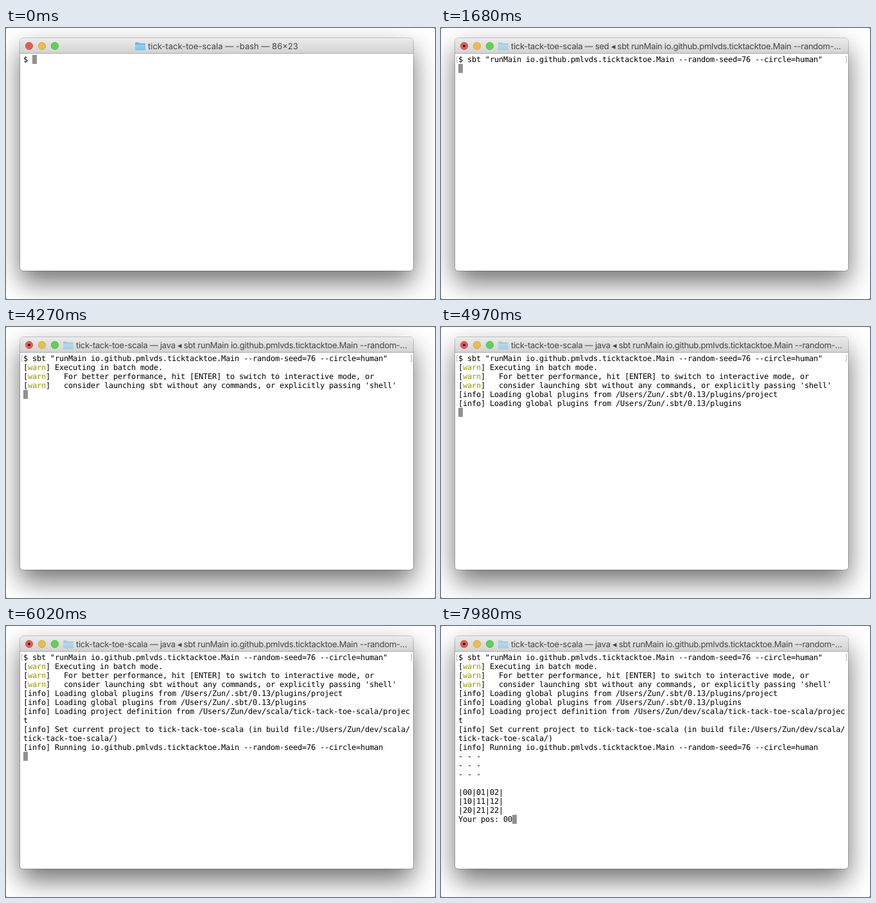
An HTML page that plays this animation: 668x422 px, repeating every 8000 ms.

```html
<!DOCTYPE html>
<html lang="en">
<head>
<meta charset="utf-8">
<title>Terminal session</title>
<style>
  html, body { margin: 0; width: 100%; height: 100%; overflow: hidden; background: #fff; }
  svg { display: block; width: 100vw; height: 100vh; }
  text { text-rendering: geometricPrecision; }
  .title { font: 13px Inter, "DejaVu Sans", sans-serif; fill: #444; }
  .tight { letter-spacing: -0.27px; }
  .mono { font: 12px "DejaVu Sans Mono", monospace; }
</style>
</head>
<body>
<svg viewBox="0 0 668 422" xmlns="http://www.w3.org/2000/svg">
  <defs>
    <filter id="blur" filterUnits="userSpaceOnUse" x="-60" y="-60" width="790" height="560">
      <feGaussianBlur stdDeviation="20"/>
    </filter>
    <linearGradient id="bar" x2="0" y2="1">
      <stop offset="0" stop-color="#ebebeb"/>
      <stop offset="1" stop-color="#d2d2d2"/>
    </linearGradient>
    <linearGradient id="folder" x2="0" y2="1">
      <stop offset="0" stop-color="#93d0f2"/>
      <stop offset="1" stop-color="#7cc3ec"/>
    </linearGradient>
  </defs>

  <rect width="668" height="422" fill="#fff"/>
  <rect x="22" y="34" width="612" height="362" rx="5" opacity=".56" filter="url(#blur)"/>
  <path d="M0 0h1v1h-1zM667 0h1v1h-1zM0 421h1v1h-1zM667 421h1v1h-1z" fill="#555"/>

  <rect x="21.5" y="15.5" width="613" height="363" rx="5.5" fill="none" stroke="#000" stroke-opacity=".2"/>
  <rect x="22" y="16" width="612" height="362" rx="5" fill="#fff"/>
  <path d="M22 40V21a5 5 0 0 1 5-5H629a5 5 0 0 1 5 5V40z" fill="url(#bar)"/>
  <path d="M27 16.5H629" stroke="#f4f4f4"/>
  <path d="M22 39.5H634" stroke="#aaa"/>

  <g stroke-width=".8">
    <circle cx="36" cy="28" r="5.7" fill="#dc5f5b" stroke="#c24d49"/>
    <circle cx="56" cy="28" r="5.7" fill="#e8bd55" stroke="#cfa140"/>
    <circle cx="76" cy="28" r="5.7" fill="#63cf58" stroke="#4db145"/>
  </g>
  <circle id="dot" cx="36" cy="28" r="2" fill="#4a0d0b"/>

  <g id="icon">
    <path d="M0 1.5Q0 .5 1 .5H5.5L7 2H15Q16 2 16 3V11.5Q16 12.500 15 12.500H1Q0 12.500 0 11.5z" fill="#6bb4df"/>
    <path d="M0 4H16V11.5Q16 12.500 15 12.500H1Q0 12.500 0 11.5z" fill="url(#folder)"/>
  </g>
  <text id="title" class="title" y="33"></text>

  <path id="marks" d="M26.500 44.500H24.500V53.500H26.500M629.500 44.500H631.500V53.500H629.500" fill="none" stroke="#b4b4b4"/>
  <rect id="cursor" width="7" height="14" fill="#919191"/>
  <g id="screen" class="mono"></g>
</svg>

<script>
const LOOP = 8000, COLS = 86, CELL = 7, LINE = 14, LEFT = 27, TOP = 42;
const ENTER = 1540, RETITLE = 1610, JAVA = 1820;
const main = "io.github.pmlvds.ticktacktoe.Main";
const home = "/Users/Zun";
const name = "tick-tack-toe-scala";
const flags = "--random-seed=76 --circle=human";

// Output chunks: [time, text]
const output = [
  [0, "$ "],
  [1050, `sbt "runMain ${main} ${flags}"`],
  [ENTER, "\n"],
  [2310, "[warn] Executing in batch mode.\n" +
    "[warn]   For better performance, hit [ENTER] to switch to interactive mode, or\n" +
    "[warn]   consider launching sbt without any commands, or explicitly passing 'shell'\n"],
  [4550, `[info] Loading global plugins from ${home}/.sbt/0.13/plugins/project\n`],
  [4970, `[info] Loading global plugins from ${home}/.sbt/0.13/plugins\n`],
  [5460, `[info] Loading project definition from ${home}/dev/scala/${name}/project\n`],
  [5810, `[info] Set current project to ${name} (in build file:${home}/dev/scala/${name}/)\n`],
  [5950, `[info] Running ${main} ${flags}\n`],
  [6090, "- - -\n".repeat(3) + "\n|00|01|02|\n|10|11|12|\n|20|21|22|\nYour pos: "],
  [7840, "0"],
  [7980, "0"]
];

const el = id => document.getElementById(id);
const screen = el("screen"), cursor = el("cursor"), title = el("title");
const colX = col => LEFT + col * CELL;
const rowY = row => TOP + row * LINE;

function addRun(row, col, str, fill) {
  const run = document.createElementNS("http://www.w3.org/2000/svg", "text");
  run.setAttribute("x", [...str].map((_, i) => colX(col + i)).join(" "));
  run.setAttribute("y", rowY(row) + 11);
  run.setAttribute("fill", fill);
  run.textContent = str.replace(/ /g, "\u00a0");
  screen.append(run);
  return run;
}

// Lay the stream out on the character grid once, wrapping at the last column.
function layOut() {
  let row = 0, col = 0;
  return output.map(([time, text]) => {
    const runs = [];
    for (const part of text.split(/(\n|warn)/)) {
      if (part === "\n") { row++; col = 0; continue; }
      const fill = part === "warn" ? "#999900" : "#000";
      for (let rest = part; rest;) {
        if (col === COLS) { row++; col = 0; }
        const piece = rest.slice(0, COLS - col);
        runs.push(addRun(row, col, piece, fill));
        col += piece.length;
        rest = rest.slice(piece.length);
      }
    }
    return { time, runs, row, col };
  });
}

const chunks = layOut();
const show = (node, on) => node.setAttribute("visibility", on ? "visible" : "hidden");

function render(t) {
  let last = chunks[0];
  for (const chunk of chunks) {
    const on = t >= chunk.time;
    if (on) last = chunk;
    chunk.runs.forEach(run => show(run, on));
  }
  cursor.setAttribute("x", colX(last.col));
  cursor.setAttribute("y", rowY(last.row));

  const busy = t >= RETITLE;
  const x = busy ? 109 : 221;
  const job = t >= JAVA ? "java" : "sed";
  title.textContent = busy
    ? `${name} — ${job} ◂ sbt runMain ${main} --random-…`
    : `${name} — -bash — 86×23`;
  title.setAttribute("x", x);
  title.classList.toggle("tight", busy);
  el("icon").setAttribute("transform", `translate(${x - 20} 22)`);
  el("icon").setAttribute("opacity", busy ? 0.5 : 1);
  show(el("dot"), t >= ENTER);
  show(el("marks"), t >= ENTER);
}

const start = performance.now();
function tick() {
  render((performance.now() - start) % LOOP);
  requestAnimationFrame(tick);
}
tick();
</script>
</body>
</html>
```
